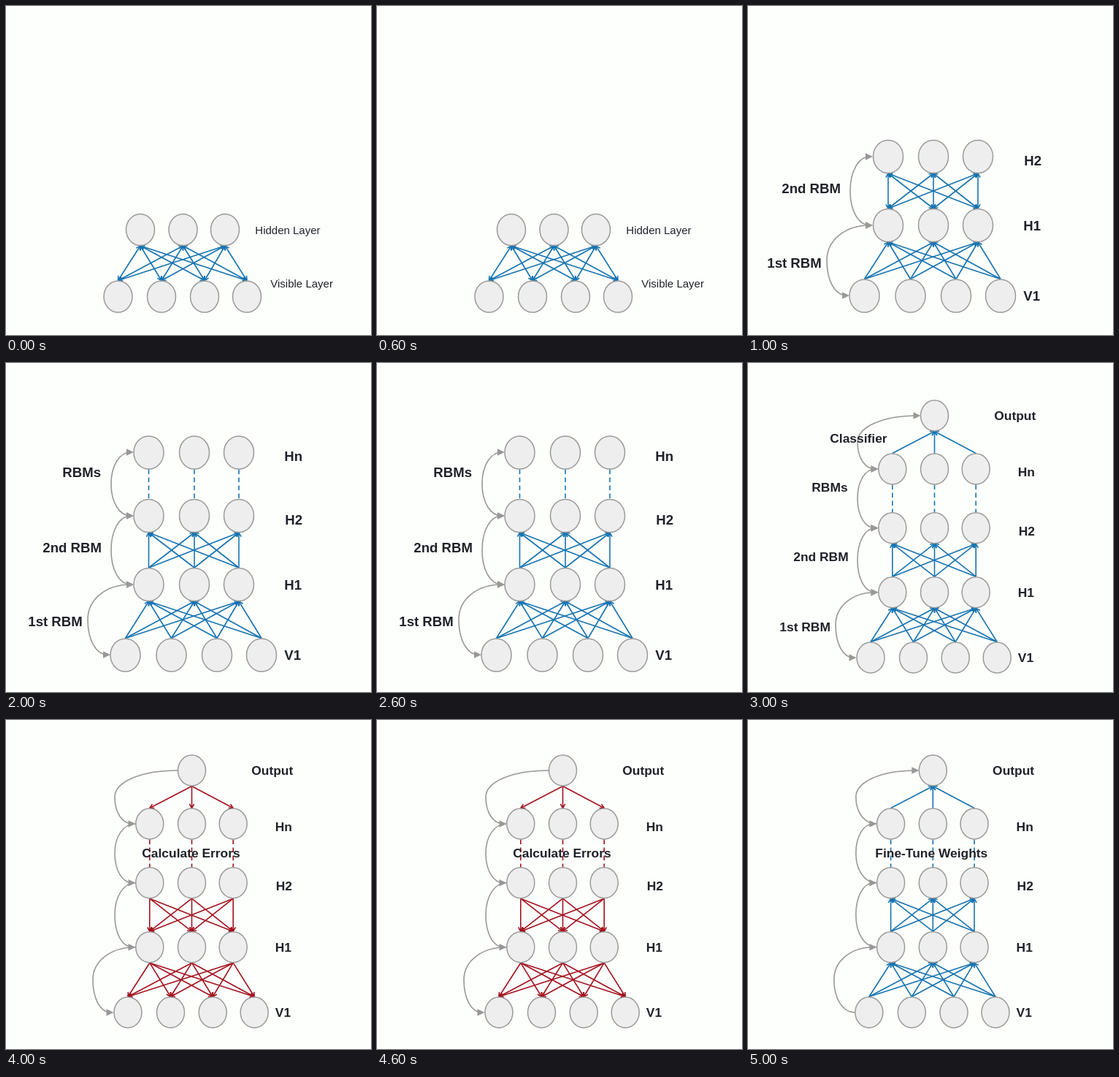
These frames come from a looping animation (500x450 px, 6 s). An HTML page with a canvas:

```html
<!DOCTYPE html>
<html lang="en">
<head>
<meta charset="utf-8">
<title>Layered network training</title>
<style>
html, body { margin: 0; width: 100%; height: 100%; overflow: hidden; background: #fdfffc; }
canvas { display: block; }
</style>
</head>
<body>
<canvas id="stage" width="500" height="450"></canvas>
<script>
const ctx = document.getElementById('stage').getContext('2d');
const BLUE = '#1673b1', RED = '#a3121f', GRAY = '#989898';
const STEP = 1000;

// Rows are [centre y, x positions], listed from the top.
// Links are [upper row, kind], where kind is 'up', 'down', 'both' or 'dash'.
// Braces are [start x, start y, leftmost x, end x, end y, heads].
const scenes = [
  {
    rx: 19.5, ry: 21.5, color: BLUE, font: '15px',
    rows: [[306, [184, 242.5, 300]], [397.5, [153.5, 213, 272, 330]]],
    links: [[0, 'both']],
    braces: [],
    labels: [['Hidden Layer', 342, 307], ['Visible Layer', 363, 380]]
  },
  {
    rx: 20.5, ry: 22.5, color: BLUE, font: 'bold 18.6px',
    rows: [[206, [192, 254, 315]], [300, [192, 254, 315]], [396.5, [159.5, 222.5, 285, 346]]],
    links: [[0, 'both'], [1, 'up']],
    braces: [[171, 206, 140, 171, 300, 'both'], [171, 300, 108, 139, 396, 'both']],
    labels: [['H2', 379, 211], ['H1', 378, 300], ['V1', 378, 396],
      ['2nd RBM', 47, 249], ['1st RBM', 27, 351]]
  },
  {
    rx: 20.5, ry: 22.5, color: BLUE, font: 'bold 18.6px',
    rows: [[122.5, [195.5, 258, 319]], [209, [195.5, 258, 319]], [303, [195.5, 258, 319]],
      [399.5, [163.5, 226.5, 289, 350]]],
    links: [[0, 'dash'], [1, 'up'], [2, 'up']],
    braces: [[175, 122, 144, 175, 209, 'both'], [175, 209, 144, 175, 303, 'both'],
      [175, 303, 112, 143, 399, 'both']],
    labels: [['Hn', 382, 127], ['H2', 383, 214], ['H1', 382, 303], ['V1', 382, 399],
      ['RBMs', 78, 149], ['2nd RBM', 51, 252], ['1st RBM', 31, 353]]
  },
  deep(255.5, 72, BLUE, 'up', 'both', [['Classifier', 113, 103], ['RBMs', 88, 170],
    ['2nd RBM', 63, 265], ['1st RBM', 44, 361]]),
  deep(254.5, 69, RED, 'down', 'end', [['Calculate Errors', 187, 182]]),
  deep(253.3, 69, BLUE, 'up', 'start', [['Fine-Tune Weights', 175, 182]])
];

// Full five-row network, placed by the centre of its output node.
function deep(x, y, color, way, heads, notes) {
  const three = [x - 57.7, x, x + 56.7];
  const side = x - 77, left = x - 105.5;
  const hn = y + 73, h2 = y + 153.7, h1 = y + 241.7, v1 = y + 331;
  return {
    rx: 19, ry: 21, color, font: 'bold 17.4px',
    rows: [[y, [x]], [hn, three], [h2, three], [h1, three],
      [v1, [x - 87.5, x - 29, x + 28.7, x + 85.7]]],
    links: [[0, way], [1, 'dash'], [2, way], [3, way]],
    braces: [[x - 19, y, left, side, hn, heads], [side, hn, left, side, h2, heads],
      [side, h2, left, side, h1, heads], [side, h1, x - 135.5, x - 107, v1, heads]],
    labels: [['Output', x + 82.5, y], ['Hn', x + 115, y + 77], ['H2', x + 116, y + 158],
      ['H1', x + 115, y + 241.5], ['V1', x + 115, y + 331], ...notes]
  };
}

function line(x0, y0, x1, y1) {
  ctx.beginPath();
  ctx.moveTo(x0, y0);
  ctx.lineTo(x1, y1);
  ctx.stroke();
}

function openHead(x0, y0, x1, y1) {
  const a = Math.atan2(y1 - y0, x1 - x0);
  for (const turn of [-0.5, 0.5]) {
    line(x1, y1, x1 - 6.5 * Math.cos(a + turn), y1 - 6.5 * Math.sin(a + turn));
  }
}

function drawLink(scene, [top, kind]) {
  const [ya, upper] = scene.rows[top], [yb, lower] = scene.rows[top + 1];
  const y0 = ya + scene.ry + 0.5, y1 = yb - scene.ry - 0.5;
  ctx.strokeStyle = scene.color;
  ctx.lineWidth = 1.6;
  if (kind === 'dash') {
    ctx.setLineDash([6.5, 4.5]);
    upper.forEach(x => line(x, y0, x, y1));
    ctx.setLineDash([]);
    return;
  }
  for (const a of upper) for (const b of lower) {
    line(a, y0, b, y1);
    if (kind !== 'down') openHead(b, y1, a, y0);
    if (kind !== 'up') openHead(a, y0, b, y1);
  }
}

function solidHead(x, y) {
  ctx.beginPath();
  ctx.moveTo(x, y);
  ctx.lineTo(x - 10, y - 4.8);
  ctx.lineTo(x - 10, y + 4.8);
  ctx.fill();
}

function drawBrace([x0, y0, left, x1, y1, heads]) {
  const mid = (y0 + y1) / 2, k = 0.42;
  ctx.strokeStyle = ctx.fillStyle = GRAY;
  ctx.lineWidth = 1.6;
  const sx = heads === 'end' ? x0 : x0 - 4;
  const ex = heads === 'start' ? x1 : x1 - 4;
  ctx.beginPath();
  ctx.moveTo(sx, y0);
  ctx.bezierCurveTo(left + (sx - left) * k, y0, left, mid + (y0 - mid) * 0.58, left, mid);
  ctx.bezierCurveTo(left, mid + (y1 - mid) * 0.58, left + (ex - left) * k, y1, ex, y1);
  ctx.stroke();
  if (heads !== 'end') solidHead(x0, y0);
  if (heads !== 'start') solidHead(x1, y1);
}

function drawNode(x, y, rx, ry) {
  ctx.beginPath();
  ctx.ellipse(x, y, rx, ry, 0, 0, Math.PI * 2);
  ctx.fillStyle = '#eeeeee';
  ctx.strokeStyle = '#9a9a9a';
  ctx.lineWidth = 1.5;
  ctx.fill();
  ctx.stroke();
}

function drawScene(scene) {
  ctx.fillStyle = '#fdfffc';
  ctx.fillRect(0, 0, 500, 450);
  scene.links.forEach(link => drawLink(scene, link));
  scene.braces.forEach(drawBrace);
  for (const [y, xs] of scene.rows) xs.forEach(x => drawNode(x, y, scene.rx, scene.ry));
  ctx.font = scene.font + ' "Liberation Sans", Arial, sans-serif';
  ctx.fillStyle = '#20222a';
  const half = parseFloat(scene.font.replace('bold ', '')) * 0.355;
  for (const [text, x, y] of scene.labels) ctx.fillText(text, x - 0.7, y + half);
}

function tick() {
  const t = performance.now() % (STEP * scenes.length);
  drawScene(scenes[Math.floor(t / STEP)]);
  requestAnimationFrame(tick);
}
tick();
</script>
</body>
</html>
```
